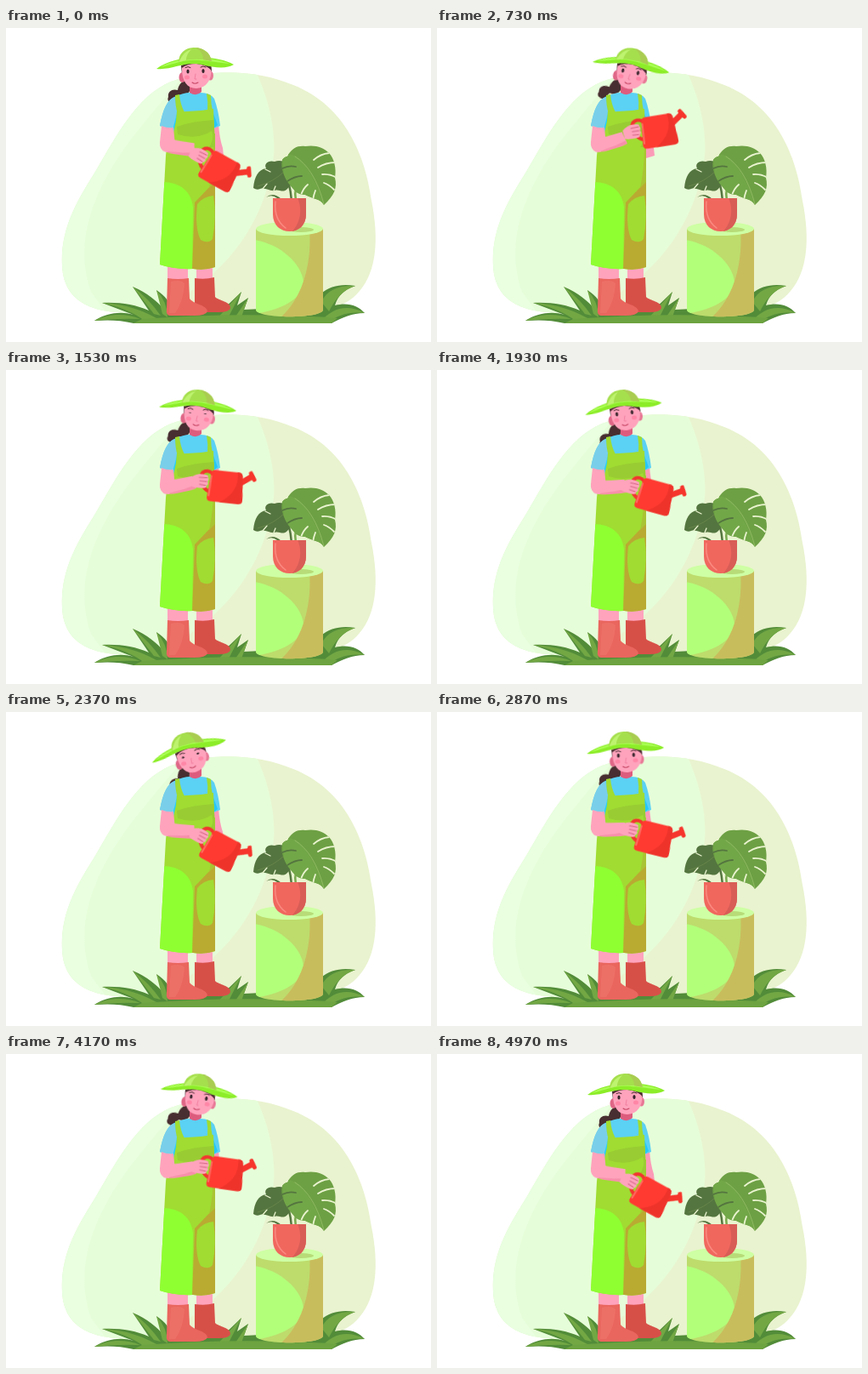
An HTML page for the animation above (5 s loop, 500x369 px).

```html
<!DOCTYPE html>
<html lang="en">
<head>
<meta charset="utf-8">
<title>Watering the plant</title>
<style>
html, body { margin: 0; width: 100%; height: 100%; overflow: hidden; background: #fff; }
svg { display: block; width: 100vw; height: 100vh; }
.line { fill: none; stroke-linecap: round; stroke-linejoin: round; }
.head { transform-origin: 222px 75px; animation: nod 5s ease-in-out infinite; }
.forearm { transform-origin: 190px 138px; animation: lift 2.5s linear infinite; }
.can { animation: pour 2.5s linear infinite; }
.eye { transform-box: fill-box; transform-origin: center; animation: blink 5s linear infinite; }

@keyframes nod {
  0%, 100% { transform: rotate(0deg); }
  14.6% { transform: rotate(11deg); }
  30.6% { transform: rotate(6deg); animation-timing-function: cubic-bezier(.3, .2, .6, 1); }
  47.4% { transform: rotate(-14deg); }
  67.4% { transform: rotate(11deg); }
  83.4% { transform: rotate(9deg); }
}
@keyframes lift {
  0% { transform: rotate(8deg); animation-timing-function: cubic-bezier(.4, 0, .7, .85); }
  29.2% { transform: rotate(-17deg); }
  34.8% { transform: rotate(-21deg); animation-timing-function: ease-out; }
  40% { transform: rotate(-22deg); animation-timing-function: ease-in-out; }
  61.2% { transform: rotate(-12deg); }
  66.8% { transform: rotate(-9deg); }
  94.8% { transform: rotate(4deg); animation-timing-function: ease-out; }
  100% { transform: rotate(8deg); }
}
@keyframes pour {
  0% { transform: translate(252px, 168px) rotate(29deg); animation-timing-function: cubic-bezier(.4, 0, .7, .85); }
  29.2% { transform: translate(261px, 121px) rotate(-9deg); }
  34.8% { transform: translate(258.5px, 116.5px) rotate(-18deg); animation-timing-function: ease-out; }
  40% { transform: translate(258px, 114.5px) rotate(-21deg); animation-timing-function: ease-in-out; }
  61.2% { transform: translate(258.5px, 137.5px) rotate(6deg); }
  66.8% { transform: translate(258.5px, 140.5px) rotate(8deg); }
  94.8% { transform: translate(253px, 163px) rotate(28deg); animation-timing-function: ease-out; }
  100% { transform: translate(252px, 168px) rotate(29deg); }
}
@keyframes blink {
  0%, 28.5%, 32.5%, 46%, 49%, 100% { transform: scaleY(1); }
  30%, 31.2% { transform: scaleY(.18); }
  47.4% { transform: scaleY(.45); }
}
</style>
</head>
<body>
<svg viewBox="0 0 500 369" preserveAspectRatio="none">
  <defs>
    <path id="blob" d="M66 279C64 236 83 204 105 169C131 125 154 80 194 63C238 47 297 49 338 67C399 91 423 150 430 203C439 248 436 286 416 309C399 330 369 335 333 335H150C108 335 68 326 66 279Z"/>
    <path id="drum" d="M294 236V331C294 342 373 342 373 331V236Z"/>
    <path id="skirt" d="M190 132L246 124L246 281Q234 285 220 283Q198 284 181 278L188 150Z"/>
    <path id="bib" d="M201 98Q222 99 244 95L246 140H189Q200 122 201 98Z"/>
    <path id="pot" d="M314 200H353V219C353 232 344 239 333.500 239S314 232 314 219Z"/>
    <path id="crown" d="M203 40C204 27 213 23 222 23S240 28 242 39Q222 34 203 40Z"/>
    <path id="body" d="M-14 -18.500H14Q18 -18.500 18.500 -14.500L21 14Q21 18.500 16 18.500H-16Q-21 18.500 -21 14L-18.500 -14.500Q-18 -18.500 -14 -18.500Z"/>
    <path id="leaf" d="M338 189C328 179 322 164 325 155C328 150 332 152 332 149C337 141 343 138 352 139C363 137 374 140 380 147C386 153 389 165 387 176C390 188 386 197 374 208C370 200 360 201 352 196C345 196 341 193 338 189Z"/>
    <clipPath id="inBlob"><use href="#blob"/></clipPath>
    <clipPath id="inDrum"><use href="#drum"/></clipPath>
    <clipPath id="inSkirt"><use href="#skirt"/></clipPath>
    <clipPath id="inBib"><use href="#bib"/></clipPath>
    <clipPath id="inPot"><use href="#pot"/></clipPath>
    <clipPath id="inCrown"><use href="#crown"/></clipPath>
    <clipPath id="inBody"><use href="#body"/></clipPath>
    <clipPath id="inLeaf"><use href="#leaf"/></clipPath>
  </defs>

  <!-- backdrop -->
  <use href="#blob" fill="#e9f3cf"/>
  <g clip-path="url(#inBlob)">
    <path d="M60 40H289C308 78 321 124 313 165C300 232 262 282 205 318L160 340H60Z" fill="#e6fdd9"/>
    <path d="M60 40H222C181 91 147 125 121 170C96 214 83 263 100 310L122 340H60Z" fill="#e9ffe0"/>
  </g>

  <!-- grass -->
  <path d="M104 344C119 334 137 333 150 337L113 323C134 322 152 325 168 332L149 304C166 311 178 321 186 331L177 308C188 315 193 323 196 332H254L277 310L272 326L285 317L280 331L300 330V334H371V312C380 303 396 300 411 303C398 307 390 315 387 326C402 322 414 326 422 335C407 335 396 340 383 347H150C134 343 120 343 104 344Z" fill="#528c39"/>
  <path d="M104 344C121 335 141 335 158 342Q130 341 104 344ZM113 323C141 324 165 333 184 345H164Q146 330 113 323ZM149 304Q168 318 182 338L174 336ZM177 308Q190 322 190 340L184 336ZM277 310L260 343H247ZM285 317L276 342H268ZM371 322C378 307 392 302 411 303C396 308 387 319 380 333ZM371 345C383 329 402 324 422 335C402 333 390 338 379 346Z" fill="#72a744"/>
  <path d="M160 342Q280 333 390 341L383 347H150Z" fill="#6da340"/>

  <!-- pedestal -->
  <use href="#drum" fill="#bddc6c"/>
  <g clip-path="url(#inDrum)">
    <path d="M293 249C322 254 348 276 350 299C349 318 325 330 298 335H293Z" fill="#b2ff7a"/>
    <path d="M357 236C360 275 350 318 321 342H375V236Z" fill="#c8bd5d"/>
  </g>
  <ellipse cx="333.500" cy="236" rx="39.500" ry="8" fill="#ceffa4"/>
  <ellipse cx="347" cy="237" rx="15" ry="3" fill="#b7dc78"/>

  <!-- plant -->
  <g class="line" stroke="#55763f" stroke-width="2.500">
    <path d="M336 203Q334 180 326 165"/>
    <path d="M341 203Q338 187 347 174" stroke="#79a84e"/>
  </g>
  <path d="M291 188C292 175 297 166 306 165C303 159 309 155 316 157C325 154 333 159 338 166C340 174 338 183 330 190C325 194 321 189 316 191C310 192 305 187 299 189Q295 191 291 188Z" fill="#54753f"/>
  <path d="M306 199Q314 192 324 201L319 200Q313 195 306 199Z" fill="#54753f"/>
  <g class="line" stroke="#e9f3cf">
    <path d="M305 166L311 169M302 189L307 183M315 191L317 186" stroke-width="1.300"/>
    <path d="M296 186Q315 181 328 168" stroke="#6c8a50" stroke-width=".8"/>
  </g>
  <use href="#leaf" fill="#6da044"/>
  <g clip-path="url(#inLeaf)">
    <path d="M342 151C356 164 366 182 374 209L330 198L324 145Z" fill="#72a748"/>
    <g class="line" stroke="#e9f3cf" stroke-width="1.800">
      <path d="M380 147Q370 148 362 155M388 158Q376 158 367 164M389 176Q381 171 372 172M386 190Q380 184 374 182M347 197Q349 189 355 184M361 202Q362 196 364 191"/>
    </g>
    <path class="line" d="M325 165Q333 161 341 163M331 180Q340 174 348 174" stroke="#54753f" stroke-width="1.800"/>
    <path class="line" d="M340 151Q363 165 374 207" stroke="#94bd66" stroke-width=".9"/>
  </g>
  <use href="#pot" fill="#f0675e"/>
  <g clip-path="url(#inPot)">
    <path d="M343 199Q352 222 336 240H356V199Z" fill="#d85d56"/>
    <path d="M317 204Q315 225 329 235" class="line" stroke="#fa8a80" stroke-width="1.500"/>
  </g>

  <!-- hair behind the body -->
  <g class="head" fill="#482e30">
    <path d="M216 60C208 61 203 66 202 73C195 71 190 75 191 81C189 85 192 88 197 88C202 87 201 82 204 80C210 82 216 77 217 71Z"/>
    <path d="M206 44Q223 36 241 43L242 51L207 54Z"/>
  </g>

  <!-- legs and boots -->
  <path d="M190 278H214V298H190ZM224 278H243V298H224Z" fill="#ffa3bd"/>
  <path d="M222 294Q234 296 245 293L246 316C251 321 264 321 264 329Q263 334 250 334H222Z" fill="#d75048"/>
  <path d="M190 294Q202 296 215 294L216 318C221 325 236 325 237 333Q235 338 222 338H193Q188 338 189 330Z" fill="#e9665e"/>
  <path d="M194 298Q205 295 210 300Q209 321 199 335H192Z" fill="#f07870" opacity=".55"/>

  <!-- torso -->
  <path d="M242 112L250 113Q251 129 255 141L256 150L246 153Z" fill="#fb9bb8"/>
  <path d="M198 81Q209 76 216 76H229Q240 76 245 83Q250 97 252 115L244 118L242 132H198L197 118Q188 118 181 115Q186 86 198 81Z" fill="#5bd1f4"/>
  <path d="M198 81Q186 86 181 115Q189 118 197 117L201 97Z" fill="#79cfe9"/>
  <path d="M197 116L202 98L203 132H198Z" fill="#22cfff"/>
  <path d="M243 98L249 114L244 118Z" fill="#25c8f8"/>
  <use href="#skirt" fill="#a0dc32"/>
  <g clip-path="url(#inSkirt)">
    <path d="M184 181C205 181 218 192 220 211L219 286H178Z" fill="#8fff32"/>
    <path d="M247 179L222 205L219 286H248Z" fill="#b9aa32"/>
    <path d="M247 124H243Q246 155 239 188L247 180Z" fill="#a9c432"/>
  </g>
  <path d="M225 207Q232 198 244 197Q248 222 243 248Q238 254 229 249Q222 236 225 207Z" fill="#a0dc32"/>
  <use href="#bib" fill="#a0dc32"/>
  <g clip-path="url(#inBib)">
    <path d="M201 116Q221 109 247 108V142H238Q246 129 242 121Q225 132 202 125Z" fill="#99cc32"/>
  </g>
  <path d="M199 79L204 78Q205 90 210 99L202 101Q199 92 199 79ZM236 77L241 79Q241 89 243 97L237 98Q238 87 236 77Z" fill="#a0dc32"/>

  <!-- head -->
  <path d="M216 66H230V75Q224 81 216 76Z" fill="#dd5c7e"/>
  <g class="head">
    <ellipse cx="207.500" cy="58" rx="4" ry="6" fill="#df6787"/>
    <ellipse cx="240.500" cy="56" rx="3.500" ry="5.500" fill="#e87896"/>
    <path d="M207 43Q223 37 241 44C243 58 238 70 224 71C212 71 206 61 207 43Z" fill="#ffa3bd"/>
    <path d="M206 44Q221 38 241 43L242 50Q235 43 224 42Q213 42 207 47Z" fill="#482e30"/>
    <g fill="#ff86a6">
      <ellipse cx="213" cy="58" rx="3" ry="2.500"/>
      <ellipse cx="234" cy="57" rx="3" ry="2.500"/>
    </g>
    <g class="line" stroke="#4a2b31">
      <path d="M211 46.500Q214 44.500 217 46.500M229 46Q232 44 235 46"/>
      <path d="M223 54L222 60L224 60" stroke="#ed7898" stroke-width=".8"/>
      <path d="M219 64Q222 66.500 226 64" stroke="#c84c69" stroke-width="1.100"/>
    </g>
    <g fill="#35232a">
      <ellipse class="eye" cx="214" cy="51" rx="1.600" ry="2.500"/>
      <ellipse class="eye" cx="232" cy="50.500" rx="1.600" ry="2.500"/>
    </g>
    <path d="M177 48C189 39 206 35 222 35C242 34 257 37 268 43C260 48 246 47 230 43C209 39 195 50 177 48Z" fill="#8ced28"/>
    <path d="M182 46C199 34 244 33 263 42C242 40 230 37 216 38C202 39 193 44 182 46Z" fill="#aaff54"/>
    <use href="#crown" fill="#a5df4d"/>
    <g clip-path="url(#inCrown)">
      <path d="M221 22Q234 28 232 41H245V22Z" fill="#a9cc51"/>
      <path d="M203 41Q209 27 218 25Q211 32 212 40Z" fill="#bdf36f"/>
    </g>
  </g>

  <!-- near arm -->
  <path d="M183 115Q190 118 197 117L199 138Q196 147 188 145Q180 143 181 134Z" fill="#ffa3bd"/>
  <g class="forearm">
    <path d="M188 130Q204 131 221 131L223 146Q205 148 190 146Q182 145 182 138Z" fill="#ffa3bd"/>
    <path d="M191 145Q207 145 222 142L223 146Q207 148 191 146Z" fill="#f78faa"/>
  </g>

  <!-- can and hand -->
  <g class="can">
    <path class="line" d="M-17 -14C-23 -19 -31 -16 -30 -8C-29 0 -25 6 -17 8" stroke="#f1362e" stroke-width="4"/>
    <g class="line" stroke="#f6352c">
      <path d="M15 -5L29 -15" stroke-width="7"/>
      <path d="M28 -19L32.500 -12" stroke-width="5"/>
    </g>
    <use href="#body" fill="#ff3a31"/>
    <g clip-path="url(#inBody)">
      <path d="M12 -20Q18 5 -8 20H24V-20Z" fill="#ee332b"/>
      <path d="M-18 -11L-19 12" class="line" stroke="#ff6a60" stroke-width="2"/>
    </g>
    <g transform="translate(1 2)">
      <path d="M-43 -9Q-36 -15 -27 -14Q-22 -14 -23 -11Q-21 -9 -23 -6Q-21 -3 -24 -1Q-23 2 -28 2Q-36 3 -42 1Z" fill="#ffa3bd"/>
      <path class="line" d="M-33 -10L-24 -10.500M-32 -6L-24 -6M-32 -2L-25 -1.500" stroke="#cc5d7b" stroke-width=".9"/>
    </g>
  </g>
</svg>
</body>
</html>
```
